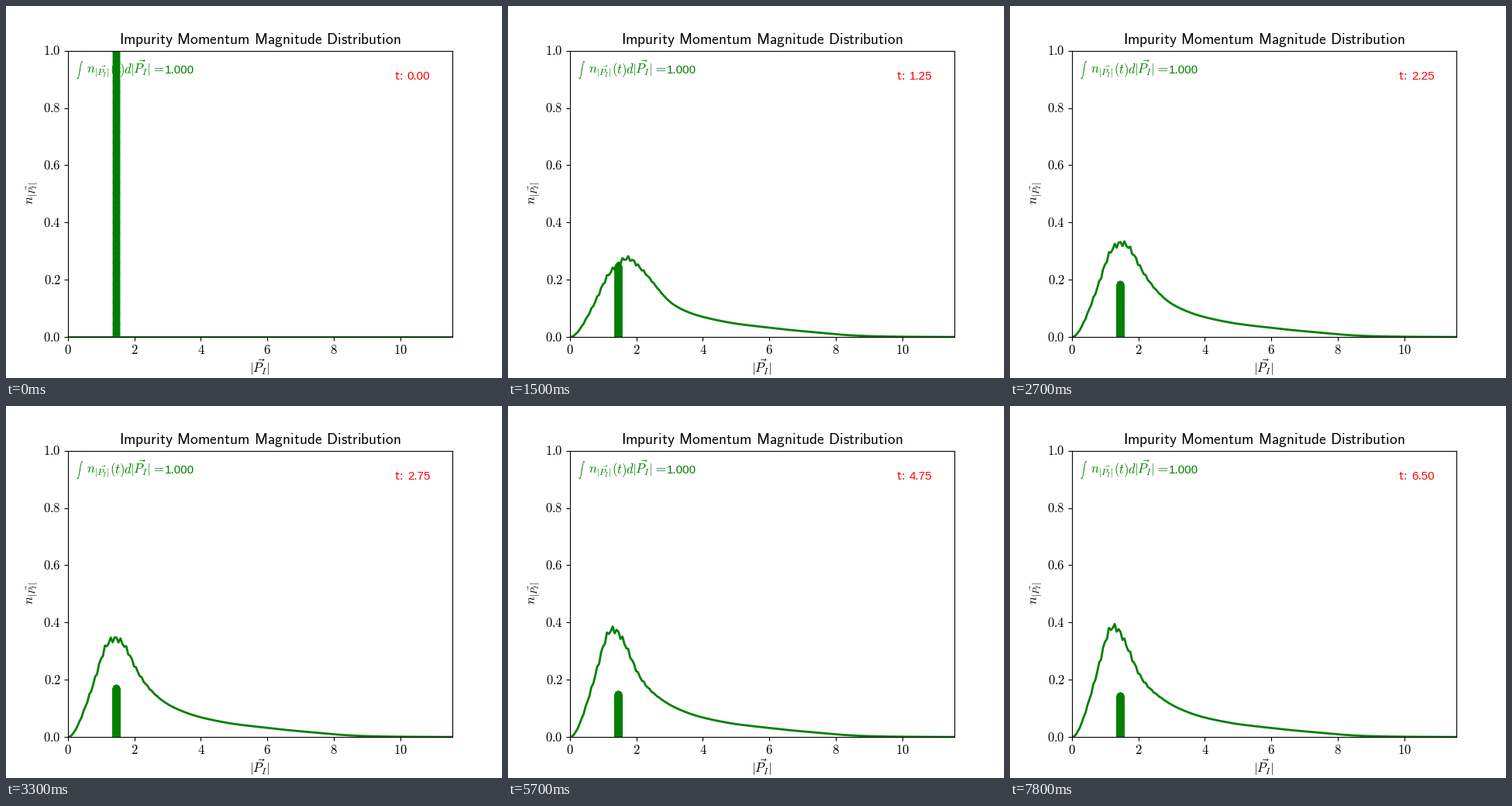
A matplotlib script that plays this animation: 640x480 px, repeating every 8000 ms.

```python
import numpy as np
import matplotlib.pyplot as plt
from matplotlib.animation import FuncAnimation

plt.rcParams.update({"mathtext.fontset": "cm", "font.size": 12,
                     "font.family": "Liberation Sans"})

P_MAX, P_BAR = 11.57, 1.457
STEPS = 198
T_END = 6.5
GREEN = "green"

# Late-time density at a few momenta
KEY_P = np.array([0.23, 0.7, 1.17, 1.4, 1.63, 2.1, 2.8, 3.55, 4.7, 6.25, 7.7, 9.1, 11.6])
KEY_N = np.array([33, 207, 388, 380, 329, 209, 130, 86, 52, 29, 13, 3, 0.3]) / 1000

index = np.arange(STEPS + 1)
momentum = index * P_MAX / STEPS


def smooth(x, xs, ys):
    """Cubic Hermite curve through the nodes."""
    slope = np.gradient(ys, xs)
    k = np.clip(np.searchsorted(xs, x, side="right") - 1, 0, len(xs) - 2)
    w = xs[k + 1] - xs[k]
    s = (x - xs[k]) / w
    return (ys[k] * (1 + 2 * s) * (1 - s) ** 2 + slope[k] * w * s * (1 - s) ** 2
            + ys[k + 1] * s * s * (3 - 2 * s) + slope[k + 1] * w * s * s * (s - 1))


# Interpolating log(n / p^2) keeps the curve positive and quadratic near zero
late = momentum ** 2 * np.exp(smooth(momentum, KEY_P, np.log(KEY_N / KEY_P ** 2)))
# Grid roughness beats with the momentum step and fades beyond the maximum
late *= 1 + 0.034 * np.cos(2 * np.pi * (index - 11) / 2.7) * np.exp(-(momentum / 2.4) ** 6)


def peak(t):
    """Weight left in the initial momentum."""
    return 0.137 + 0.863 / (1 + 2.7 * t + 2.21 * t * t)


def density(t):
    """Low momenta fill up last, behind a bump that moves inwards."""
    lag = 1 / (1 + t) - 1 / (1 + T_END)
    missing = 1.53 * lag / (1 + (momentum / (1.46 + 0.6 * lag)) ** 8)
    bump = 0.6 * lag ** 0.8 * np.exp(-((momentum - 1.7 - 2 * lag) / 0.6) ** 2)
    shape = late * np.clip(1 - missing + bump, 0, None)
    return shape * (1 - peak(t)) / (shape.sum() * P_MAX / STEPS)


def sans(text):
    text = text.replace(":", r"\hspace{-0.2}:").replace(" ", r"\hspace{0.38}")
    return rf"$\mathsf{{{text}}}$"


fig = plt.figure(figsize=(6.4, 4.8), dpi=100)
ax = fig.add_axes([0.125, 0.11, 0.775, 0.77])
ax.set(xlim=(0, P_MAX), ylim=(0, 1))
ax.set_xticks(range(0, 11, 2), [f"${v}$" for v in range(0, 11, 2)])
ax.set_yticks(np.arange(6) / 5, [])
ax.tick_params(axis="x", pad=2.8)
ax.set_title(sans("Impurity Momentum Magnitude Distribution"), fontsize=14)


def label(x, y, text, **style):
    return fig.text(x / 640, 1 - y / 480, text, **style)


for v in np.arange(6) / 5:
    label(71, 426.4 - 369.6 * v, f"${v:.1f}$", ha="right", va="center_baseline")

VEC = r"|\vec{P_I}|"
label(327, 466, f"${VEC}$", ha="center", va="center")
label(43.5, 241.4, f"$n_{{{VEC}}}$", ha="right", va="center", rotation=90)
label(90, 82.5, r"$\int$", color=GREEN, fontsize=6, va="center")
for x, part in [(104, f"$n_{{{VEC}}}$"), (134, "$(t)d$"),
                (160, rf"${VEC}\hspace{{0.1}}=$")]:
    label(x, 87.2, part, color=GREEN)
label(204.5, 87.2, "1.000", color=GREEN, fontsize=11)
label(501, 94.6, sans("t:"), color="red")
clock = label(517.8, 94.6, "", color="red", fontsize=11)

curve, = ax.plot([], [], color=GREEN, lw=2)
bar, = ax.plot([], [], color=GREEN, marker="o", lw=2)


def update(frame):
    t = 0.25 * (frame // 3)
    curve.set_data(momentum, density(t))
    bar.set_data(np.full(200, P_BAR), np.linspace(0, peak(t), 200))
    clock.set_text(f"{t:.2f}")
    return curve, bar, clock


anim = FuncAnimation(fig, update, frames=80, interval=100, repeat=True, repeat_delay=0)
plt.show()
```
